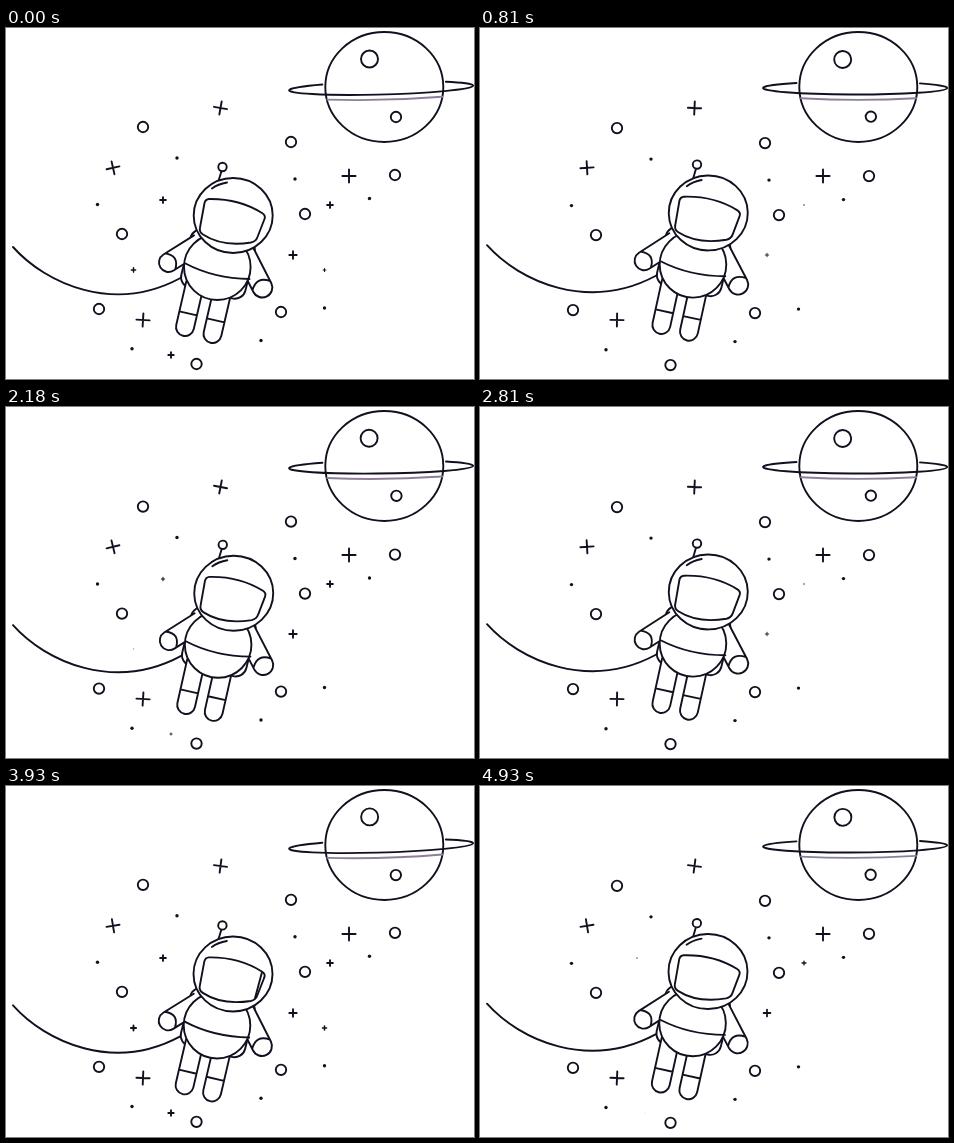
An HTML page that plays this animation: 468 by 351 pixels, repeating every 5000 ms.

```html
<!DOCTYPE html>
<html lang="en">
<head>
<meta charset="utf-8">
<title>Floating astronaut</title>
<style>
  html, body { margin: 0; width: 100%; height: 100%; overflow: hidden; background: #fff; }
  svg { display: block; width: 468px; height: 351px; }
  .line { fill: none; stroke: #12101f; stroke-width: 1.9; stroke-linecap: round; stroke-linejoin: round; }
  .solid { fill: #fff; }
  .dot { fill: #12101f; stroke: none; }
</style>
</head>
<body>
<svg viewBox="0 0 468 351" class="line">
  <defs>
    <clipPath id="visorClip"><use href="#visor"/></clipPath>
  </defs>

  <ellipse cx="378.3" cy="59" rx="59" ry="55"/>
  <g id="craters">
    <circle cx="363.5" cy="31" r="8.5"/>
    <circle cx="390" cy="89" r="5.2"/>
  </g>
  <g id="ring">
    <path d="M321 70.3Q378 73.5 436 70.3" stroke="#8d7f9c"/>
    <path d="M316.5 55A92 6.5 0 1 0 440 55.4"/>
  </g>

  <g id="stars"></g>
  <path id="tether"/>

  <g id="astronaut" class="solid">
    <rect x="-33" y="-30" width="66" height="60" rx="11" transform="translate(212 236) rotate(14)"/>
    <g transform="translate(179 299) rotate(13)">
      <path d="M-9 -45V0A9 9 0 0 0 9 0V-45M-9 -14H9"/>
    </g>
    <g transform="translate(206.5 306) rotate(13)">
      <path d="M-9 -45V0A9 9 0 0 0 9 0V-45M-9 -14H9"/>
    </g>
    <g transform="translate(162.5 234.5) rotate(58)">
      <path d="M-9.5 -36V0A9.5 9.5 0 0 0 9.5 0V-36M-9.5 -2Q0 -13 9.5 -2"/>
    </g>
    <g transform="translate(256.3 259.5) rotate(-27)">
      <path d="M-10 -46V0A10 10 0 0 0 10 0V-46M-10 -2Q0 -13 10 -2"/>
    </g>
    <ellipse cx="211.3" cy="239" rx="33.3" ry="33"/>
    <path d="M179.5 235.5Q208 250.5 243.5 251" fill="none"/>
    <path d="M215.5 143L212.5 153"/>
    <circle cx="216.5" cy="139" r="4.2"/>
    <ellipse cx="227.2" cy="187.5" rx="39.5" ry="37.5"/>
    <path d="M206 160.5Q212 156 221 154.5" fill="none"/>
    <path id="visor" d="M203 171Q233 170.5 256 185Q260 187.5 258.5 191L251.5 209Q250 213.5 245 214.5Q216 219 197 206.5Q193 204 194 199.5L198.5 175Q199.5 171.2 203 171Z"/>
    <g clip-path="url(#visorClip)">
      <path id="glint" d="M8 -30L-8 30M12 -30L-4 30"/>
    </g>
  </g>
</svg>

<script>
const LOOP = 5000, HALF = 1000, TOP = 605, REST = 0.66;
const byId = id => document.getElementById(id);
const clamp = v => Math.min(1, Math.max(0, v));

function add(tag, attrs) {
  const el = document.createElementNS('http://www.w3.org/2000/svg', tag);
  for (const name in attrs) el.setAttribute(name, attrs[name]);
  return byId('stars').appendChild(el);
}

const place = (el, value) => el.setAttribute('transform', value);
const cross = n => add('path', { d: `M${-n} 0H${n}M0 ${-n}V${n}` });

const drifting = [
  ...[[137, 99], [285, 114], [389, 147], [299, 186], [116, 206], [93, 281], [275, 284], [190.5, 336]]
    .map(([cx, cy]) => add('circle', { cx, cy, r: 5.2 })),
  ...[[171, 130], [91.5, 176.5], [289, 151], [363.5, 170.5], [318.5, 280], [255, 312.5], [126, 320.7]]
    .map(([cx, cy]) => add('circle', { cx, cy, r: 1.7, class: 'dot' }))
];

// x, y, largest tilt in degrees
const turning = [[214.5, 80, 12], [107, 139.8, -15], [343, 148, 0], [137, 292, 4]]
  .map(([x, y, tilt]) => ({ x, y, tilt, el: cross(6.6) }));

// x, y, half size, moment the sparkle begins to grow
const sparkles = [
  [287, 227, 3.7, 85], [324, 177, 2.9, 150], [157, 172, 2.9, 275],
  [165, 327, 2.7, 315], [127.5, 242, 2.6, 392], [318.5, 242, 2.5, 460]
].map(([x, y, size, start]) => ({ x, y, start, el: cross(size) }));

function draw(now) {
  // The scene plays forward and backward; s runs 0..1000 and back.
  const phase = (now % LOOP - TOP + 2 * HALF) % (2 * HALF);
  const s = phase < HALF ? phase : 2 * HALF - phase;
  const k = (1 - Math.cos(Math.PI * s / HALF)) / 2;
  const d = k - REST;

  place(byId('astronaut'), `translate(${-1.9 * d} ${4.6 * d}) rotate(${1.2 * d} 227 187)`);
  byId('tether').setAttribute('d',
    `M7 ${219 + 3.2 * d}C40 ${256 + 3.4 * d} ${108 - d} ${286 + 3.8 * d} ${174.5 - 2.5 * d} ${250 + 4 * d}`);
  place(byId('ring'), `rotate(${-2.6 * (k - 0.1)} 375 60)`);
  place(byId('craters'), `rotate(${3 * d} 378 59)`);

  for (const el of drifting) place(el, `translate(0 ${-2 * d})`);

  const bump = Math.sin(Math.PI * s / HALF) ** 3;
  for (const c of turning) place(c.el, `translate(${c.x} ${c.y}) rotate(${c.tilt * bump})`);

  for (const c of sparkles) {
    const size = clamp((s - c.start) / 260);
    c.el.style.display = size ? '' : 'none';
    place(c.el, `translate(${c.x} ${c.y}) scale(${size})`);
  }

  const sweep = clamp((s - 640) / 180);
  byId('glint').style.display = sweep > 0 && sweep < 1 ? '' : 'none';
  place(byId('glint'), `translate(${264 - 84 * sweep ** 1.2} 199)`);
}

function tick() {
  draw(performance.now());
  requestAnimationFrame(tick);
}
tick();
</script>
</body>
</html>
```
